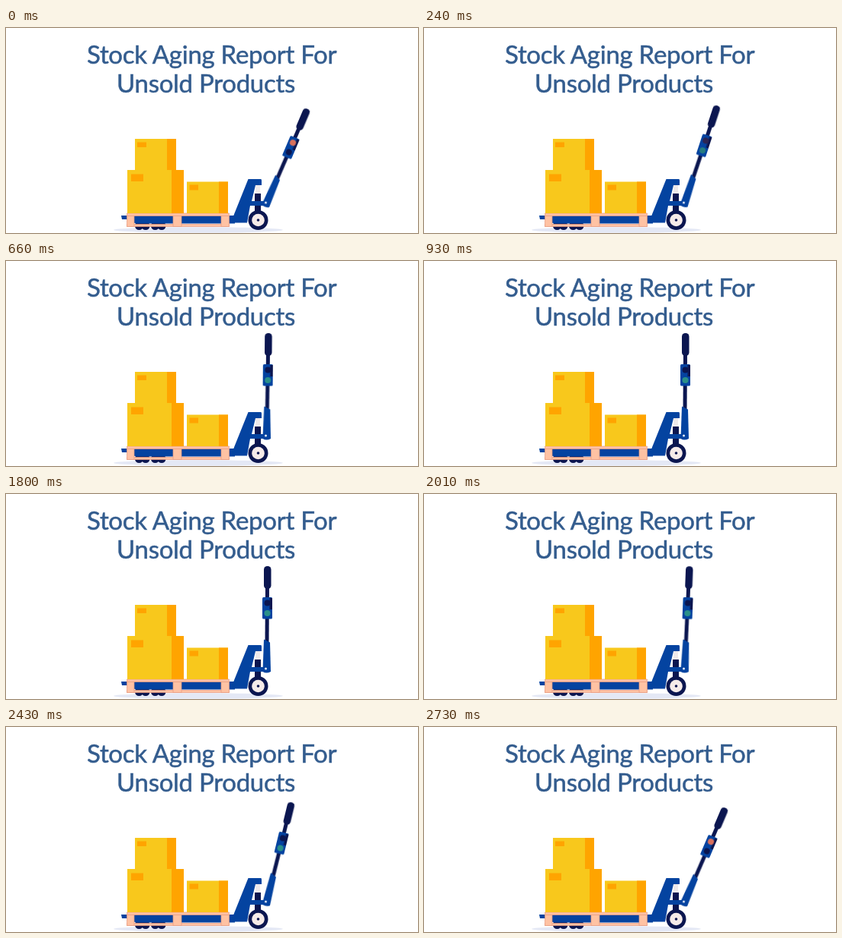
These frames come from a looping animation (540x270 px, 3600 ms). An HTML page without scripts:

```html
<!DOCTYPE html>
<html lang="en">
<head>
<meta charset="utf-8">
<title>Stock Aging Report</title>
<style>
  html, body { margin: 0; width: 100%; height: 100%; overflow: hidden; background: #fff; }
  svg { display: block; width: 100%; height: 100%; }
  text { font: 33px Lato, Carlito, sans-serif; letter-spacing: -.28px; fill: #335c8e; stroke: #335c8e; stroke-width: .5; }
  .blue { fill: #0443a0; }
  .navy { fill: #0b1650; }
  .box { fill: #f8c81c; }
  .side { fill: #ffa400; }
  .wood { fill: #ffc2a3; stroke: #e79a80; stroke-width: .7; }
  .handle { transform-origin: 340.5px 230px; animation: swing 3.6s infinite; }
  .stop { animation: stop 3.6s linear infinite; }
  .go { animation: go 3.6s linear infinite; }
  @keyframes swing {
    0% { transform: rotate(22.9deg); animation-timing-function: cubic-bezier(.8, 0, .5, 1); }
    15% { transform: rotate(-3.6deg); animation-timing-function: ease-in-out; }
    20.417% { transform: rotate(2.3deg); animation-timing-function: ease-in-out; }
    25.833%, 50% { transform: rotate(0deg); animation-timing-function: ease-in-out; }
    55.417% { transform: rotate(2.3deg); animation-timing-function: ease-in-out; }
    60.833% { transform: rotate(-3.6deg); animation-timing-function: cubic-bezier(.5, 0, .2, 1); }
    75.833%, 100% { transform: rotate(22.9deg); }
  }
  @keyframes stop {
    0%, 75.833%, 100% { fill: #d9705c; }
    8%, 67.833% { fill: #0b1650; }
  }
  @keyframes go {
    0%, 75.833%, 100% { fill: #0b1650; }
    8%, 67.833% { fill: #2a9089; }
  }
</style>
</head>
<body>
<svg viewBox="0 0 540 270">
  <text x="106" y="47">Stock Aging Report For</text>
  <text x="145" y="84.5">Unsold Products</text>

  <ellipse cx="252" cy="266" rx="111" ry="3.8" fill="#e4e8f5"/>

  <g class="navy">
    <circle cx="174.5" cy="260.5" r="5.5"/>
    <circle cx="183" cy="260.5" r="5.5"/>
    <circle cx="195.5" cy="260.5" r="5.5"/>
    <circle cx="204" cy="260.5" r="5.5"/>
  </g>
  <path class="blue" d="M151 247H300V257.5H170L158 252H152Z"/>

  <g class="wood">
    <path d="M158.500 258.500H292.500V261.500H158.500Z"/>
    <path d="M158.500 247H168V261.500H158.500ZM219 247H230V261.500H219ZM282 247H292.500V261.500H282Z"/>
    <path d="M158.500 244H292.500V247.500H158.500Z"/>
  </g>

  <path class="box" d="M169 146H223V187H169ZM159 187H233V244H159ZM237 202.500H291V244H237Z"/>
  <path class="side" d="M211 146H223V187H211ZM217 187H233V244H217ZM279 202.500H291V244H279Z"/>
  <path class="side" d="M172 150.500H184V157H172ZM164 192.500H180V202H164ZM240.500 206.500H252V213.500H240.500Z"/>

  <path fill="#eee9ea" d="M327 206H333V220H327Z"/>
  <path class="navy" d="M326 218H334V245H326Z"/>
  <path class="blue" d="M317.500 199H334Q335 199 335 201V207H327L322 228H344V234H320L316 256.500H294.500Z"/>
  <circle class="navy" cx="330.500" cy="253" r="13"/>
  <circle cx="330.500" cy="253" r="8.300" fill="#f6ebe9"/>
  <circle class="navy" cx="330.500" cy="253" r="1.800"/>

  <g class="handle">
    <path class="navy" d="M340 120H345L344.500 196H339.500Z"/>
    <rect class="navy" x="338" y="95" width="9.500" height="30" rx="4.500"/>
    <rect class="blue" x="336" y="136" width="13" height="28.500" rx="1.500"/>
    <path class="navy" d="M345.500 137H349V152H345.500Z"/>
    <circle class="stop" cx="342.500" cy="143.500" r="4"/>
    <circle class="go" cx="342.500" cy="157" r="4"/>
    <path class="blue" d="M338 191.500L346 195.500L347 234Q341 237 336.500 234Z"/>
    <circle cx="340.500" cy="230" r="1.500" fill="#e9eef8"/>
  </g>
</svg>
</body>
</html>
```
